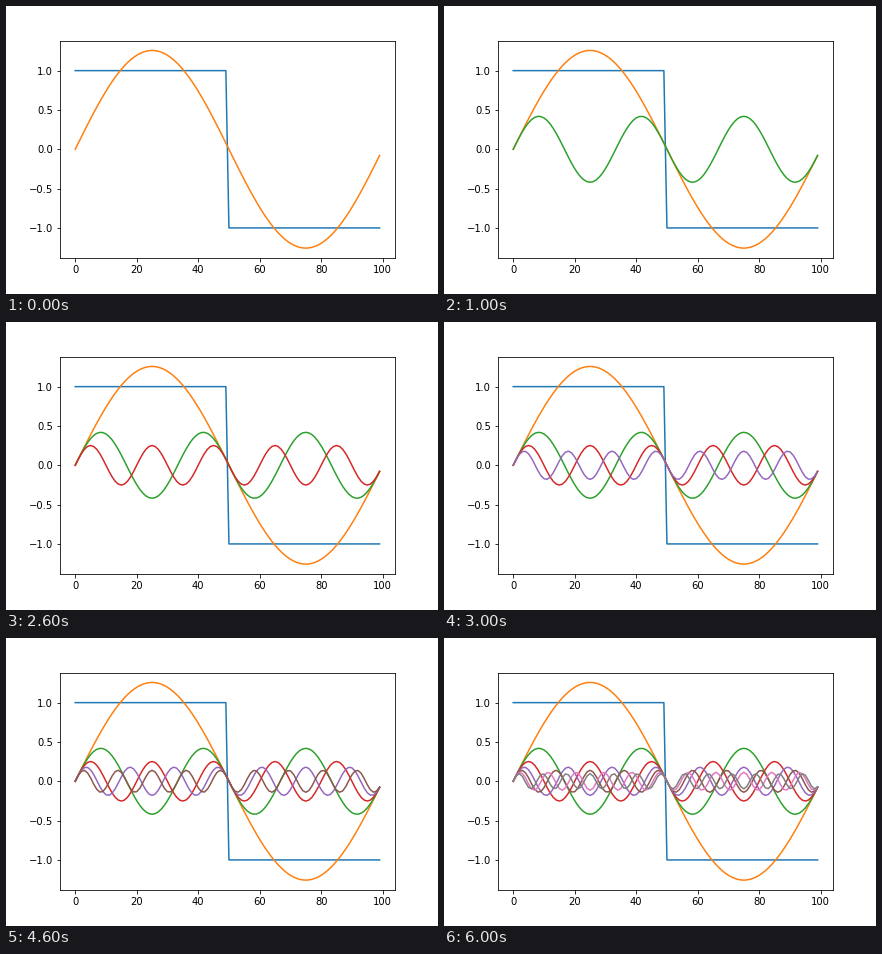
These frames come from a looping animation (432 by 288 pixels, 7000 ms). A matplotlib script:

```python
import numpy as np
import matplotlib.pyplot as plt
from matplotlib.animation import FuncAnimation

SAMPLES = 100
HARMONICS = 7
AMPLITUDE = 0.4 * np.pi

plt.rcParams["font.family"] = "DejaVu Sans"

fig, ax = plt.subplots(figsize=(6, 4), dpi=72, facecolor="white")
fig.subplots_adjust(left=0.125, right=0.9, bottom=0.125, top=0.88)

n = np.arange(SAMPLES)
ax.plot(n, np.where(n < SAMPLES // 2, 1, -1), color="C0")


def sine_term(k):
    """Odd harmonic of the square wave."""
    return AMPLITUDE * np.sin(2 * np.pi * k * n / SAMPLES) / k


terms = [
    ax.plot(n, sine_term(2 * i + 1), color=f"C{i + 1}")[0]
    for i in range(HARMONICS)
]


def update(step):
    for i, line in enumerate(terms):
        line.set_visible(i <= step)
    return terms


anim = FuncAnimation(fig, update, frames=HARMONICS, interval=1000,
                     init_func=lambda: update(0), repeat=True, repeat_delay=0)

plt.show()
```
